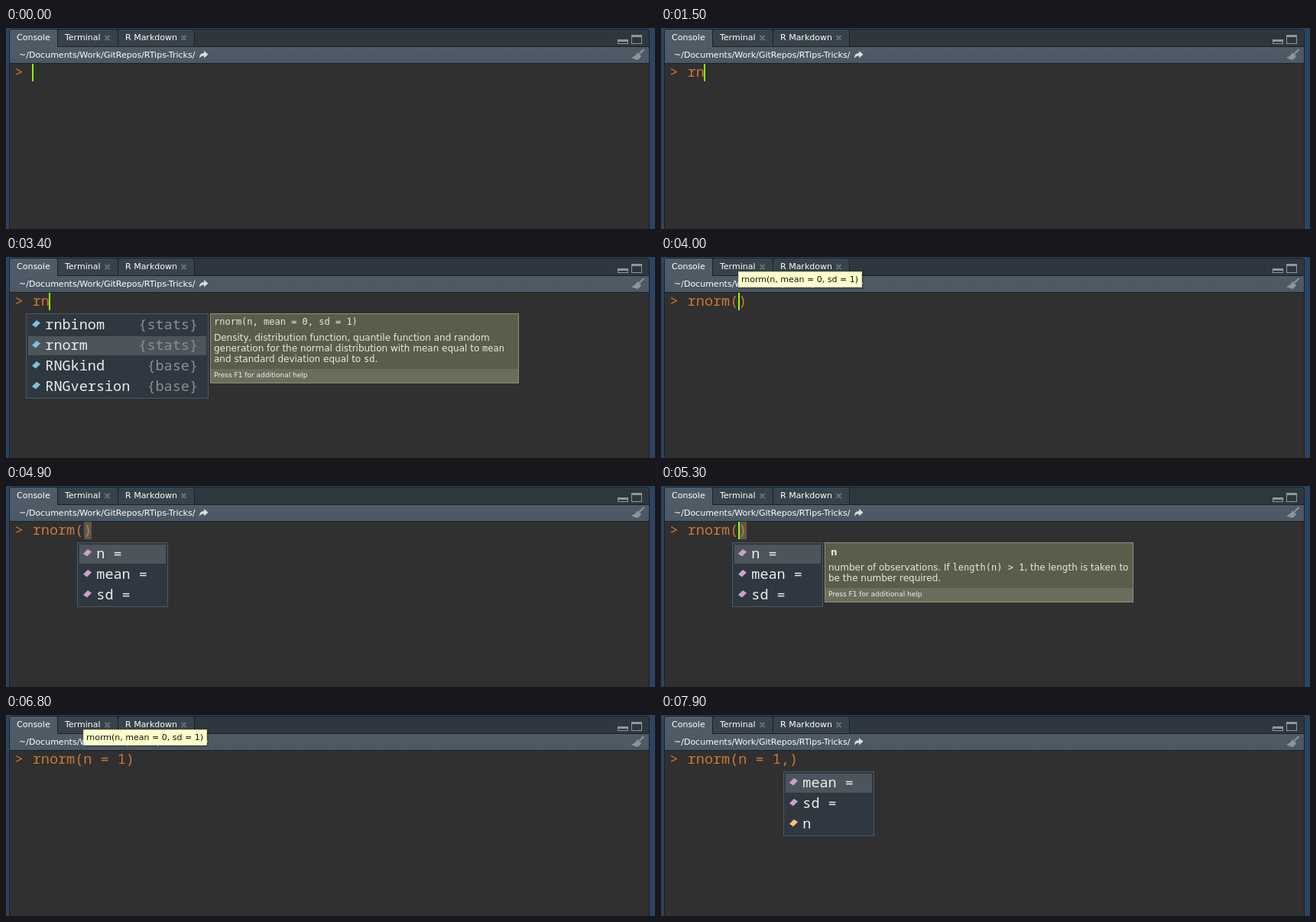
Animation, 849 px wide and 264 px high, one loop 8 s. Source, as an HTML page:

```html
<!DOCTYPE html>
<html lang="en">
<head>
<meta charset="utf-8">
<title>Console completion</title>
<style>
html, body { margin: 0; width: 100%; height: 100%; overflow: hidden; background: #2d4460; }
svg { display: block; }
text { white-space: pre; }
.ui { font: 11px "DejaVu Sans", sans-serif; fill: #fff; }
.code { font: 18.5px "Noto Sans Mono", monospace; }
.doc { font: 12px "DejaVu Sans", sans-serif; fill: #e8e8e2; }
.mono { font: 12px "DejaVu Sans Mono", monospace; fill: #e8e8e2; }
.foot { font: 9px "DejaVu Sans", sans-serif; fill: #f0f0ea; }
</style>
</head>
<body>
<svg id="stage" width="849" height="264" viewBox="0 0 849 264">
  <defs>
    <linearGradient id="bar" x2="0" y2="1">
      <stop offset="0" stop-color="#4f5c67"/><stop offset="1" stop-color="#4b5863"/>
    </linearGradient>
  </defs>
  <rect width="849" height="264" fill="#2d4460"/>
  <path d="M4.5 265V5q0-3.500 3.500-3.500H838q3.500 0 3.500 3.500V265" fill="#2f373e" stroke="#15202a"/>
  <rect x="5" y="25" width="836" height="21" fill="url(#bar)"/>
  <path d="M68 24.500H841M5 46.500H841" stroke="#192229"/>
  <rect x="5" y="47" width="836" height="217" fill="#303030"/>
  <path d="M5 25V5q0-3 3-3H64q3 0 3 3V25z" fill="#4f5c67"/>
  <g fill="#38424a" stroke="#192229">
    <path d="M67.500 24.500V5q0-3.500 3.500-3.500H143q3.500 0 3.500 3.500V24.500z"/>
    <path d="M146.500 24.500V5q0-3.500 3.500-3.500H243q3.500 0 3.500 3.500V24.500z"/>
  </g>
  <g class="ui">
    <text x="14" y="16">Console</text>
    <text x="77" y="16">Terminal</text>
    <text x="156" y="16">R Markdown</text>
    <text x="17" y="39">~/Documents/Work/GitRepos/RTips-Tricks/</text>
  </g>
  <path d="M129.500 10l6 6m0-6l-6 6M229.500 10l6 6m0-6l-6 6" stroke="#69737b" stroke-width="2"/>
  <path d="M253 40q0-7 6-7v-3l5.500 4.700-5.500 4.700v-3q-4 0-6 3.600z" fill="#d9dde0"/>
  <g fill="none" stroke="#8f989f">
    <rect x="800.500" y="15.500" width="13" height="5"/><path d="M801 17H813" stroke-width="2"/>
    <rect x="818.500" y="9.500" width="13" height="11"/><path d="M819 11H831" stroke-width="2"/>
  </g>
  <path d="M834.500 28l-6 6" stroke="#8d959b" stroke-width="2"/>
  <path d="M826 32l5 5q-2 4-5 5-4-1-8-3 6-2 8-7z" fill="#8d959b"/>
  <text class="code" x="11.500" y="64" fill="#cc7833">&gt;</text>
  <g id="view"></g>
</svg>
<script>
const LOOP = 8000, ADV = 11.1, LEFT = 34.7;
const view = document.getElementById("view");
const esc = s => s.replace(/&/g, "&amp;").replace(/</g, "&lt;").replace(/>/g, "&gt;");
const rect = (x, y, w, h, fill, extra = "") =>
  `<rect x="${x}" y="${y}" width="${w}" height="${h}" fill="${fill}" ${extra}/>`;
const frame = (x, y, w, h, fill, line) =>
  rect(x + .5, y + .5, w - 1, h - 1, fill, `stroke="${line}"`);
const text = (cls, x, y, s, extra = "") =>
  `<text class="${cls}" x="${x}" y="${y}" ${extra}>${esc(s)}</text>`;

// Text between backticks is set in the fixed-width face.
const rich = (x, y, s) => `<text class="doc" x="${x}" y="${y}">` +
  s.split("`").map((p, i) => i % 2 ? `<tspan class="mono">${esc(p)}</tspan>` : esc(p)).join("") + "</text>";

const BLUE = "#7cc4d8", PINK = "#c8a2d0", PEACH = "#f5bf85";
const lists = {
  names: { x: 26, w: 239, rows: [["rnbinom", BLUE, "{stats}"], ["rnorm", BLUE, "{stats}"],
    ["RNGkind", BLUE, "{base}"], ["RNGversion", BLUE, "{base}"]] },
  args: { x: 93, w: 119, rows: [["n =", PINK], ["mean =", PINK], ["sd =", PINK]] },
  rest: { x: 160, w: 119, rows: [["mean =", PINK], ["sd =", PINK], ["n", PEACH]] }
};
const intro = "Density, distribution function, quantile function and random";
const docs = {
  rnbinom: { x: 267, h: 92, head: "rnbinom(n, size, prob, mu)", lines: [intro,
    "generation for the negative binomial distribution with", "parameters `size` and `prob`."] },
  rnorm: { x: 267, h: 92, head: "rnorm(n, mean = 0, sd = 1)", lines: [intro,
    "generation for the normal distribution with mean equal to `mean`", "and standard deviation equal to `sd`."] },
  n: { x: 214, h: 79, bold: true, head: "n", lines: [
    "number of observations. If `length(n) > 1`, the length is taken to", "be the number required."] }
};

function drawList({ x, w, rows }, sel) {
  let out = frame(x, 74, w, 112 - 27 * (4 - rows.length), "#2f3740", "#4b5a67");
  out += rect(x + 3, 77 + 27 * sel, w - 6, 25, "#4d555c");
  rows.forEach(([name, color, pkg], i) => {
    const y = 95 + 27 * i;
    out += `<path d="M${x + 8} ${y - 6}l6-6 5 3.500-6 6z" fill="${color}"/>`;
    out += text("code", x + 25.3, y, name, 'fill="#eeeeec"');
    if (pkg) out += text("code", x + w - 14, y, pkg, 'fill="#8c8f91" text-anchor="end"');
  });
  return out;
}

function drawDoc({ x, h, head, lines, bold }) {
  const foot = 74 + h - 19;
  return frame(x, 74, 404, h, "#5c5c4b", "#8f8f7d") +
    rect(x + 1, foot, 402, 18, "#6d6d5d") +
    (bold ? text("doc", x + 8, 91, head, 'font-weight="bold" style="font-weight:bold"')
          : text("mono", x + 5, 89, head)) +
    lines.map((s, i) => rich(x + 5, (bold ? 111 : 110) + 14 * i, s)).join("") +
    text("foot", x + 5, foot + 11, "Press F1 for additional help");
}

const drawTip = () =>
  rect(103, 21, 162, 21, "#000", 'opacity=".2"') +
  frame(101, 19, 162, 21, "#ffffcc", "#d8d8b0") +
  text("ui", 105, 33, "rnorm(n, mean = 0, sd = 1)", 'style="fill:#111"');

// Each step changes only the listed fields.
const steps = [
  [0, { typed: "", tail: "", on: 1, list: "", sel: 0, doc: "", tip: 0, match: 0 }],
  [100, { on: 0 }],
  [500, { on: 1 }],
  [1000, { typed: "r" }],
  [1500, { typed: "rn" }],
  [1900, { list: "names", on: 0 }],
  [2300, { on: 1 }],
  [2500, { doc: "rnbinom" }],
  [2900, { on: 0 }],
  [3300, { on: 1, sel: 1 }],
  [3400, { doc: "rnorm" }],
  [3900, { typed: "rnorm(", tail: ")", list: "", doc: "", sel: 0 }],
  [4000, { tip: 1 }],
  [4200, { match: 1 }],
  [4600, { tip: 0, list: "args" }],
  [4900, { on: 0 }],
  [5200, { on: 1 }],
  [5300, { doc: "n" }],
  [5500, { typed: "rnorm(n = ", list: "", doc: "", tip: 1, match: 0 }],
  [6000, { on: 0 }],
  [6200, { typed: "rnorm(n = 1", on: 1 }],
  [6800, { on: 0 }],
  [7200, { on: 1 }],
  [7300, { typed: "rnorm(n = 1," }],
  [7900, { on: 0, tip: 0, list: "rest" }]
];

let shown = -1;
function draw(t) {
  const n = steps.filter(s => s[0] <= t).length;
  if (n === shown) return;
  shown = n;
  const s = Object.assign({}, ...steps.slice(0, n).map(e => e[1]));
  const x = Math.round(33.9 + ADV * s.typed.length);
  let out = s.match ? rect(x + 1, 47, 10, 23, "#5a5a52") : "";
  out += text("code", LEFT, 64, s.typed + s.tail, 'fill="#cc7833"');
  if (s.on) out += rect(x, 47, 2, 23, "#8cff00");
  if (s.list) out += drawList(lists[s.list], s.sel);
  if (s.doc) out += drawDoc(docs[s.doc]);
  if (s.tip) out += drawTip();
  view.innerHTML = out;
}

const start = performance.now();
function tick() {
  draw((performance.now() - start) % LOOP);
  requestAnimationFrame(tick);
}
draw(0);
requestAnimationFrame(tick);
</script>
</body>
</html>
```
